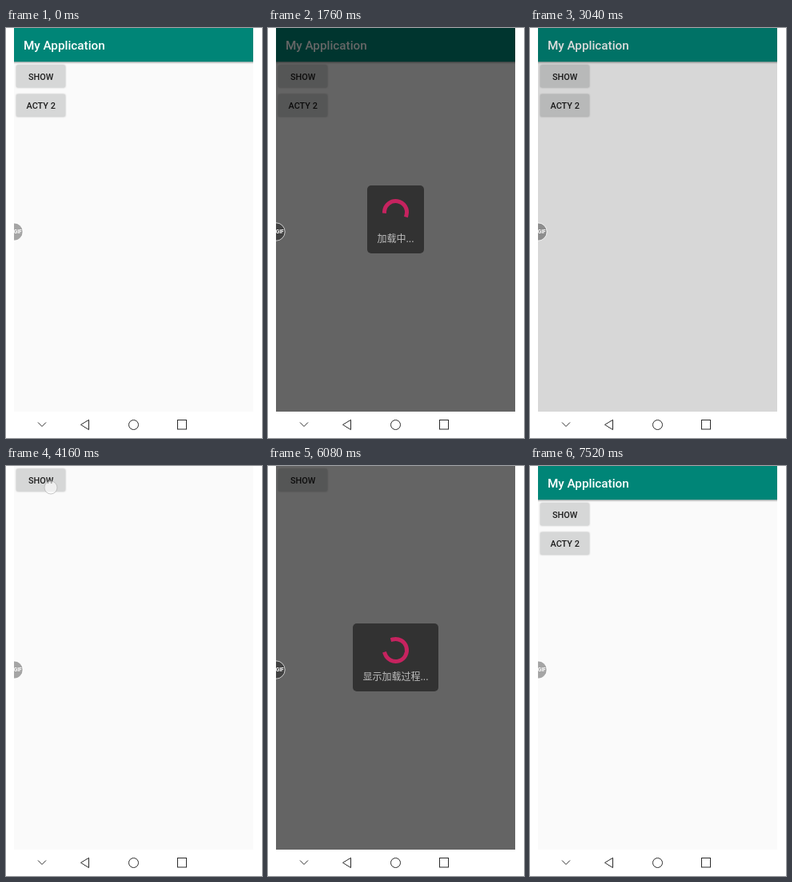
Write an HTML page that moves like this. It is 320 by 513 pixels and loops after 8480 ms.

```html
<!DOCTYPE html>
<html lang="zh-CN">
<head>
<meta charset="utf-8">
<title>Loading dialog</title>
<style>
  html, body { margin: 0; width: 100%; height: 100%; overflow: hidden; background: #fff; }
  svg { display: block; width: 100vw; height: 100vh; }
  text { font-family: Roboto, sans-serif; font-weight: 500; }
  .label { font-size: 10.9px; fill: #1c1c1c; text-anchor: middle; }
  .button rect { fill: #d6d7d7; filter: drop-shadow(0 .8px .8px rgba(0, 0, 0, .3)); }
  #message { font: 400 12px "Noto Sans CJK SC", "Noto Sans CJK", sans-serif; fill: #bebebe; text-anchor: middle; }
  #badge text { font-size: 6.5px; font-weight: 700; fill: #fff; text-anchor: end; }
  #nav { fill: none; stroke: #2b2b2b; stroke-width: 1; }
</style>
</head>
<body>
<svg viewBox="0 0 320 513">
  <defs>
    <clipPath id="screen"><rect x="10" width="299" height="480"/></clipPath>
    <linearGradient id="barShadow" x2="0" y2="1">
      <stop offset="0" stop-opacity=".32"/>
      <stop offset="1" stop-opacity="0"/>
    </linearGradient>
  </defs>
  <rect width="320" height="513" fill="#fff"/>
  <g clip-path="url(#screen)">
    <rect x="10" width="299" height="480" fill="#fafafa"/>
    <g id="content">
      <g class="button">
        <rect x="13" y="46.5" width="61" height="27.7" rx="1.5"/>
        <text class="label" x="43.7" y="64.8">SHOW</text>
      </g>
      <g class="button" id="second">
        <rect x="13" y="83.1" width="61" height="27.7" rx="1.5"/>
        <text class="label" x="43.7" y="101.4">ACTY 2</text>
      </g>
    </g>
    <g id="bar">
      <rect x="10" y="42" width="299" height="3" fill="url(#barShadow)"/>
      <rect x="10" width="299" height="42.2" fill="#008577"/>
      <text x="22" y="27" font-size="15.25" fill="#fff">My Application</text>
    </g>
    <rect id="dim" x="10" width="299" height="480"/>
    <g id="dialog">
      <rect id="panel" y="197" height="85" rx="5" fill="#323232"/>
      <path id="arc" fill="none" stroke="#c6235f" stroke-width="5" stroke-linecap="square"/>
      <text id="message" x="159.5" y="268"></text>
    </g>
    <g id="badge">
      <circle cx="10" cy="255" r="10.8" fill-opacity=".34"/>
      <circle cx="10" cy="255" r="11.2" fill="none" stroke="#fff" stroke-opacity=".75" stroke-width=".9"/>
      <text x="19.6" y="257.4">GIF</text>
    </g>
    <circle id="touch" r="8" fill="#fff" fill-opacity=".6" stroke="#aaa" stroke-opacity=".8" stroke-width=".8"/>
  </g>
  <g id="nav">
    <path d="M40 493.5l5 5 5-5"/>
    <path d="M93.5 496.4L103.5 490.3V502.6Z"/>
    <circle cx="159.5" cy="496.5" r="6"/>
    <rect x="214.5" y="490.5" width="11" height="11.5"/>
  </g>
</svg>
<script>
const LOOP = 8480, STEP = 160;
const SPIN = 1333, TURN = 2222;   // trim cycle and full rotation, ms
const FADE_IN = 220, FADE_OUT = 420, DIM = 0.6;

const sessions = [
  { start: 911, close: 2400, clear: 2720 },
  { start: 4185, close: 6720, clear: 7040, rename: 5280 }
];
const touches = [
  { at: 800, x: 56, y: 64 },
  { at: 4000, x: 52, y: 98 },
  { at: 4160, x: 56, y: 27 }
];

const el = id => document.getElementById(id);
const set = (id, attrs) => {
  for (const name in attrs) el(id).setAttribute(name, attrs[name]);
};
const show = (id, visible) => set(id, { visibility: visible ? "visible" : "hidden" });
const clamp = v => Math.min(1, Math.max(0, v));
const bezier = (a, b, c, d, u) => {
  const v = 1 - u;
  return a * v * v * v + 3 * b * v * v * u + 3 * c * v * u * u + d * u * u * u;
};

// Eases from 0 to 1 along a cubic whose x control values are given.
function ease(x, a, b, c, d) {
  if (x <= a) return 0;
  if (x >= d) return 1;
  let low = 0, high = 1;
  for (let i = 0; i < 24; i++) {
    const mid = (low + high) / 2;
    if (bezier(a, b, c, d, mid) < x) low = mid; else high = mid;
  }
  return bezier(0, 0, 1, 1, low);
}

function arcPath(age) {
  const p = (age % SPIN) / SPIN;
  const base = -90 + 90 * p + 360 * age / TURN;
  const from = base + 270 * ease(p, 0.5, 0.7, 0.6, 1);
  const to = base + 270 * ease(p, 0, 0.2, 0.1, 0.5);
  if (to - from < 0.5) return "";
  const point = deg => {
    const a = deg * Math.PI / 180;
    return `${159.5 + 14 * Math.cos(a)} ${230.5 + 14 * Math.sin(a)}`;
  };
  return `M${point(from)}A14 14 0 ${to - from > 180 ? 1 : 0} 1 ${point(to)}`;
}

function render(t) {
  const secondPage = t >= 4160 && t < 7520;
  show("bar", !secondPage);
  show("second", !secondPage);
  set("content", { transform: `translate(0 ${secondPage ? -42.7 : 0})` });

  const touch = touches.find(o => o.at === t);
  show("touch", touch);
  if (touch) set("touch", { cx: touch.x, cy: touch.y });

  const session = sessions.find(s => t >= s.start && t < s.clear + FADE_OUT);
  const fadeIn = session ? clamp((t - session.start) / FADE_IN) : 0;
  const fadeOut = session ? clamp((t - session.clear) / FADE_OUT) : 1;
  set("dim", { opacity: DIM * fadeIn * (1 - fadeOut) });

  const open = session && t < session.close;
  show("dialog", open);
  if (!open) return;
  const renamed = t >= session.rename;
  const width = renamed ? 107 : 71;
  set("dialog", { opacity: fadeIn });
  set("panel", { x: 159.5 - width / 2, width });
  set("arc", { d: arcPath(t - session.start) });
  el("message").textContent = renamed ? "显示加载过程..." : "加载中...";
}

const began = performance.now();
function tick() {
  const t = (performance.now() - began) % LOOP;
  render(Math.floor(t / STEP) * STEP);
  requestAnimationFrame(tick);
}
tick();
</script>
</body>
</html>
```
